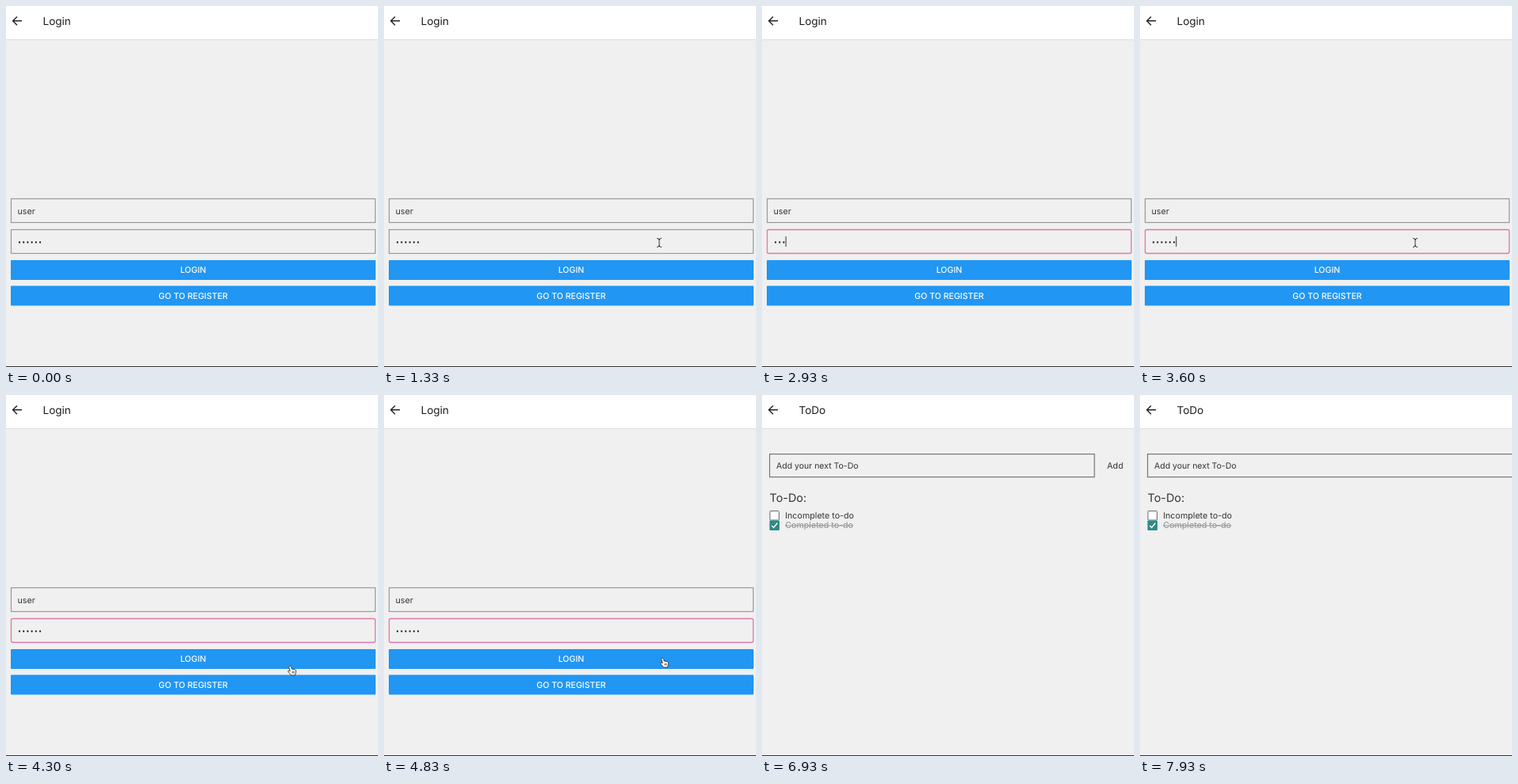
These frames come from a looping animation (469x456 px, 8 s). An HTML page:

```html
<!DOCTYPE html>
<html lang="en">
<head>
<meta charset="utf-8">
<title>Login and to-do</title>
<style>
html, body { margin: 0; width: 100%; height: 100%; overflow: hidden; background: #f0f0f0; }
svg { display: block; }
text { font: 10.7px Inter, "Open Sans", sans-serif; fill: #333; text-rendering: geometricPrecision; }
#title { font-size: 13.5px; fill: #1c1c1e; }
.button rect { fill: #2196f3; }
.button text { font-size: 10.6px; font-weight: 500; fill: #fff; text-anchor: middle; }
.field { fill: none; stroke: #999; stroke-width: 1.2; }
.field.focus { stroke: #dd78a9; stroke-width: 1.3; }
</style>
</head>
<body>
<svg width="469" height="456" viewBox="0 0 469 456">
  <rect width="469" height="456" fill="#f0f0f0"/>
  <rect width="469" height="42" fill="#fff"/>
  <path d="M0 42.6H469" stroke="#dcdcdc"/>
  <path d="M20 18.8H8.8M14 13.4L8.6 18.8L14 24.2" fill="none" stroke="#222" stroke-width="1.4"/>
  <text id="title" x="46.5" y="24"></text>

  <g id="login">
    <rect class="field" x="6.5" y="243.5" width="459" height="30"/>
    <text x="14.5" y="263">user</text>
    <rect id="password" class="field" x="6.5" y="282.5" width="459" height="30"/>
    <g id="dots" fill="#222"></g>
    <path id="caret" d="M0 291V304" stroke="#333"/>
    <g class="button">
      <rect x="6" y="321" width="460" height="25" rx="1"/>
      <text x="236" y="337.2">LOGIN</text>
    </g>
    <g class="button">
      <rect x="6" y="353.5" width="460" height="25" rx="1"/>
      <text x="236" y="370.2">GO TO REGISTER</text>
    </g>
  </g>

  <g id="todo">
    <rect id="entry" class="field" x="9.6" y="74.6" height="29" style="stroke:#777"/>
    <text x="18" y="93.2" style="font-size:10.5px">Add your next To-Do</text>
    <text id="add" x="435" y="93.2">Add</text>
    <text x="9.5" y="134.6" style="font-size:14.4px">To-Do:</text>
    <rect x="10" y="146.5" width="11.5" height="11.5" rx="1" fill="#fff" stroke="#686868"/>
    <text x="29.2" y="155.8">Incomplete to-do</text>
    <rect x="9.5" y="158.5" width="12.5" height="12.5" rx="1" fill="#2b8c85"/>
    <path d="M12.2 165L14.7 167.5L19.4 161.8" fill="none" stroke="#fff" stroke-width="1.4"/>
    <text x="29.2" y="168.4" style="fill:#8e8e8e">Completed to-do</text>
    <path d="M29 165H115.2" stroke="#8e8e8e" stroke-width=".9"/>
  </g>

  <g id="pointer">
    <path id="beam" d="M-3 -5.5Q0 -5.5 0 -3.5Q0 -5.5 3 -5.5M0 -4V4M-3 5.5Q0 5.5 0 3.5Q0 5.5 3 5.5" fill="none" stroke="#333"/>
    <path id="hand" d="M-2.5 -5.5Q-1 -6.5 -.5 -4.5L.2 -2L4.5 -1.2Q6 -.5 5.5 2L4.5 6H-.5L-4.5 1.3Q-4.5 -.3 -2.6 .6L-1.8 1L-3.2 -4Q-3.4 -5 -2.5 -5.5ZM1.2 1V3.5M3 1V3.5" fill="#fff" stroke="#333" stroke-width=".9"/>
    <path id="arrow" d="M0 0V9.5L2.2 7.5L3.8 11L5.3 10.3L3.7 7H6.5Z" fill="#111" stroke="#fff" stroke-width=".6"/>
  </g>
  <path d="M0 455.5H469" stroke="#333"/>
</svg>
<script>
const LOOP = 8000, FOCUS = 1830, OPEN = 4870, WIDEN = 7230;
const el = id => document.getElementById(id);
const show = (id, on) => el(id).style.display = on ? '' : 'none';

for (let i = 0; i < 6; i++)
  el('dots').innerHTML += `<circle cx="${17 + i * 5.2}" cy="298.5" r="1.15"/>`;

// Pointer stops: time, x, y
const stops = [[1000, 347, 299], [3600, 347, 299], [3930, 360, 348], [4330, 360, 348], [4600, 353, 338]];

function pointerAt(t) {
  const next = stops.findIndex(s => s[0] > t);
  if (next < 0) return stops.at(-1).slice(1);
  if (next === 0) return stops[0].slice(1);
  const [a, b] = [stops[next - 1], stops[next]];
  const k = (t - a[0]) / (b[0] - a[0]), e = k * k * (3 - 2 * k);
  return [1, 2].map(i => a[i] + (b[i] - a[i]) * e);
}

// The password is erased, then typed again
function dotCount(t) {
  if (t < 2500) return 6 - Math.min(6, Math.max(0, Math.floor((t - 1970) / 70)));
  return Math.min(6, Math.max(0, Math.floor((t - 2450) / 150)));
}

function draw(t) {
  const todo = t >= OPEN, focus = t >= FOCUS, count = dotCount(t);
  show('login', !todo);
  show('todo', todo);
  el('title').textContent = todo ? 'ToDo' : 'Login';

  el('password').classList.toggle('focus', focus);
  el('password').setAttribute('rx', focus ? 2 : 0);
  [...el('dots').children].forEach((dot, i) => dot.style.display = i < count ? '' : 'none');
  show('caret', focus && t < 4130);
  el('caret').setAttribute('transform', `translate(${14.5 + count * 5.2} 0)`);

  const wide = t >= WIDEN;
  el('entry').setAttribute('width', wide ? 480 : 409.5);
  show('add', !wide);

  const [x, y] = todo ? [349.5, 332] : pointerAt(t);
  show('pointer', t >= 1000 && t < 1970 || t >= 3600 && t < 5900);
  el('pointer').setAttribute('transform', `translate(${x} ${y})`);
  show('beam', !todo && y < 314);
  show('hand', !todo && y >= 314);
  show('arrow', todo);
}

const start = performance.now();
function frame() {
  draw((performance.now() - start) % LOOP);
  requestAnimationFrame(frame);
}
frame();
</script>
</body>
</html>
```
